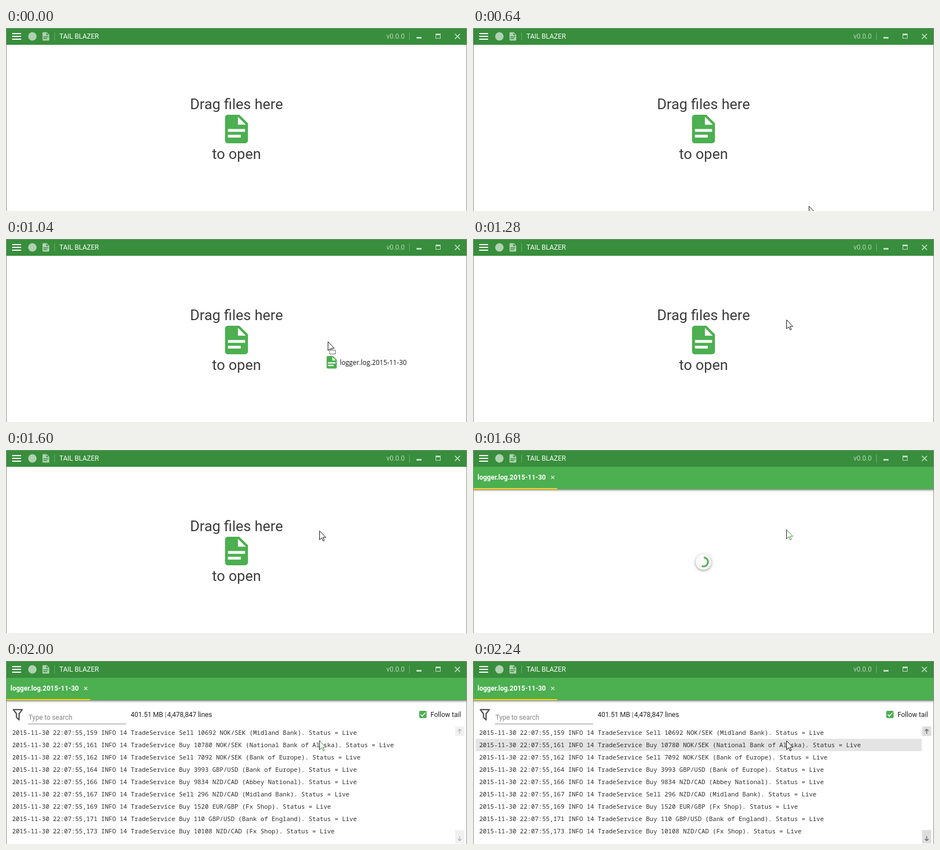
Recreate the animation shown at these times as an HTML page with a canvas. Size 821 by 327 pixels, loop 3.12 s.

```html
<!DOCTYPE html>
<html lang="en">
<head>
<meta charset="utf-8">
<title>Tail Blazer</title>
<style>
  html, body { margin: 0; width: 100%; height: 100%; overflow: hidden; background: #fff; }
  canvas { display: block; width: 821px; height: 327px; }
</style>
</head>
<body>
<canvas id="stage"></canvas>
<script>
const W = 821, H = 327, LOOP = 3120, STEP = 80;
const GREEN = '#4caf50', DARK = '#388e3c', FAINT = '#afd2b1';
const ROBOTO = 'Roboto, sans-serif';
const FILE = 'logger.log.2015-11-30';

// Moments of the story, in ms
const ENTER = 640, DROP = 1200, OPEN = 1680, LOADED = 1920, HOVER = 2080, SETTLED = 2240;

const canvas = document.getElementById('stage');
const dpr = window.devicePixelRatio || 1;
canvas.width = Math.round(W * dpr);
canvas.height = Math.round(H * dpr);
const c = canvas.getContext('2d');

const docIcon = new Path2D('M13,9H18.5L13,3.5V9M6,2H14L20,8V20A2,2 0 0,1 18,22H6C4.89,22 4,21.1 4,20V4C4,2.89 4.89,2 6,2M15,18V16H6V18H15M18,14V12H6V14H18Z');
const funnel = new Path2D('M15,19.9A1,1 0 0,1 13.3,20.7L9.3,16.7A1,1 0 0,1 9,15.9V10.75L4.2,4.6A1,1 0 0,1 5,3H19A1,1 0 0,1 19.8,4.6L15,10.75V19.9M7.04,5L11,10.06V15.58L13,17.58V10.05L16.96,5H7.04Z');
const arrow = new Path2D('M.5,.5V16.5L4.2,13L6.8,18.6L9,17.6L6.5,12.2H11.6Z');

const trades = [
  [159, 'Sell 10692 NOK/SEK (Midland Bank)'],
  [161, 'Buy 10780 NOK/SEK (National Bank of Alaska)'],
  [162, 'Sell 7092 NOK/SEK (Bank of Europe)'],
  [164, 'Buy 3993 GBP/USD (Bank of Europe)'],
  [166, 'Buy 9834 NZD/CAD (Abbey National)'],
  [167, 'Sell 296 NZD/CAD (Midland Bank)'],
  [169, 'Buy 1520 EUR/GBP (Fx Shop)'],
  [171, 'Buy 110 GBP/USD (Bank of England)'],
  [173, 'Buy 10108 NZD/CAD (Fx Shop)']
];

const clamp01 = v => Math.max(0, Math.min(1, v));

function rect(x, y, w, h, color) {
  c.fillStyle = color;
  c.fillRect(x, y, w, h);
}

function text(str, x, y, font, color, align = 'left') {
  c.font = font;
  c.fillStyle = color;
  c.textAlign = align;
  c.fillText(str, x, y);
}

function line(points, color, width) {
  c.beginPath();
  points.forEach(([x, y]) => c.lineTo(x, y));
  c.strokeStyle = color;
  c.lineWidth = width;
  c.stroke();
}

function cross(x, y, r, color, width) {
  line([[x - r, y - r], [x + r, y + r]], color, width);
  line([[x + r, y - r], [x - r, y + r]], color, width);
}

function disc(x, y, r, color) {
  c.beginPath();
  c.arc(x, y, r, 0, 7);
  c.fillStyle = color;
  c.fill();
}

function at(x, y, scale, draw) {
  c.save();
  c.translate(x, y);
  c.scale(scale, scale);
  draw();
  c.restore();
}

function icon(path, x, y, scale, color) {
  at(x, y, scale, () => {
    c.fillStyle = color;
    c.fill(path, 'evenodd');
  });
}

function titleBar() {
  rect(0, 0, W, 30, DARK);
  for (const y of [9, 14, 19]) rect(11, y, 16, 2, '#fff');
  disc(47, 15, 7.5, FAINT);
  icon(docIcon, 62, 6, 0.75, FAINT);
  rect(86, 8, 1, 14, '#6fae72');
  text('TAIL BLAZER', 95, 19, '12px ' + ROBOTO, '#fff');
  text('v0.0.0', 677.5, 19, '12px ' + ROBOTO, '#b7d6b9');
  rect(718, 8, 1, 14, '#6fae72');
  const tone = '#c6dfc7';
  rect(731, 16, 9, 3, tone);
  c.strokeStyle = tone;
  c.lineWidth = 1;
  c.strokeRect(765.5, 10.5, 8, 8);
  rect(765, 10, 9, 3, tone);
  cross(804, 15, 4.5, tone, 1.7);
}

function border() {
  rect(0, 0, W, 1, '#76917a');
  rect(0, 0, 1, H, '#8e8e8e');
  rect(W - 1, 0, 1, H, '#8e8e8e');
}

function dropHint() {
  const font = '26px ' + ROBOTO;
  text('Drag files here', 410.5, 145, font, '#3c3c3c', 'center');
  icon(docIcon, 379.9, 149.9, 2.55, GREEN);
  text('to open', 410.5, 234, font, '#3c3c3c', 'center');
}

function tabBar() {
  const shade = c.createLinearGradient(0, 70, 0, 75);
  shade.addColorStop(0, 'rgba(0,0,0,.5)');
  shade.addColorStop(0.4, 'rgba(0,0,0,.2)');
  shade.addColorStop(1, 'rgba(0,0,0,0)');
  rect(0, 70, W, 5, shade);
  rect(0, 30, W, 40, GREEN);
  text(FILE, 8, 53, 'bold 12px ' + ROBOTO, '#fff');
  cross(142, 49, 2.8, '#d3ebd4', 1.6);
  rect(1, 68, 149, 2, '#ffd600');
}

function spinner(t) {
  c.save();
  c.shadowColor = 'rgba(0,0,0,.4)';
  c.shadowBlur = 5 * dpr;
  c.shadowOffsetY = 1.5 * dpr;
  disc(410.5, 200, 14, '#fafafa');
  c.restore();
  const turn = (t - OPEN) / 1000 * Math.PI * 2;
  c.beginPath();
  c.arc(410.5, 200, 8, turn - 1.5, turn + 1.95);
  c.strokeStyle = GREEN;
  c.lineWidth = 3;
  c.stroke();
}

function searchRow() {
  icon(funnel, 7.2, 82.3, 1.15, '#555');
  const font = '12px ' + ROBOTO;
  text('Type to search', 40, 105, font, '#858585');
  rect(39, 112, 175, 1, '#8a8a8a');
  text('401.51 MB', 222, 100, font, '#202020');
  rect(284, 91, 1, 11, '#777');
  text('4,478,847 lines', 287, 100, font, '#202020');
  c.beginPath();
  c.roundRect(736, 89, 13, 13, 2);
  c.fillStyle = GREEN;
  c.fill();
  line([[738.5, 95.5], [741.3, 98.5], [746.7, 92.5]], '#fff', 1.6);
  text('Follow tail', 756, 100, font, '#202020');
}

function scrollButton(y, h, mid, dir, k) {
  const bg = 241 - 20 * k, fg = 178 - 82 * k;
  rect(800, y, 16, h, `rgb(${bg},${bg},${bg})`);
  const ink = `rgb(${fg},${fg},${fg})`;
  line([[808, mid - 4], [808, mid + 4]], ink, 1.3);
  line([[804.8, mid + dir], [808, mid + 4 * dir], [811.2, mid + dir]], ink, 1.3);
}

function log(t) {
  const k = clamp01((t - HOVER) / (SETTLED - HOVER));
  rect(5, 139, 794, 22, `rgba(0,0,0,${0.105 * k})`);
  trades.forEach(([ms, deal], i) => {
    text(`2015-11-30 22:07:55,${ms} INFO 14 TradeService ${deal}. Status = Live`,
      11, 132 + i * 22, '11px "Noto Sans Mono", monospace', '#2e2e2e');
  });
  scrollButton(117, 17, 126, -1, k);
  scrollButton(302, 24, 317, 1, k);
}

function pointerAt(t) {
  if (t >= OPEN) return [558, 142];
  const n = (t - ENTER) / STEP;
  if (n >= 8) return [558, 144];
  if (n >= 7) return [562, 151];
  const x = n < 1 ? 598 - 8 * n : Math.round(590 - 4.35 * (n - 1));
  return [x, Math.round(318 - 34.5 * n + 1.5 * n * n)];
}

function pointer(t) {
  const [x, y] = pointerAt(t);
  const tinted = t >= OPEN && t < SETTLED;
  at(x, y, 1, () => {
    c.lineJoin = 'miter';
    c.fillStyle = '#fff';
    c.fill(arrow);
    c.strokeStyle = tinted ? DARK : '#111';
    c.lineWidth = 1;
    c.stroke(arrow);
    if (tinted) rect(0, 0, 1, 17, '#222');
    if (t >= DROP) return;
    rect(3, 15, 11, 8, '#fff');
    c.setLineDash([2, 1]);
    c.strokeStyle = '#222';
    c.strokeRect(3.5, 15.5, 10, 7);
    c.setLineDash([]);
    icon(docIcon, -6.5, 23.75, 1.125, GREEN);
    text(FILE, 21.5, 42, '11.8px "Open Sans", sans-serif', '#151515');
  });
}

function draw(now) {
  const t = Math.floor(now % LOOP / STEP) * STEP;
  c.setTransform(dpr, 0, 0, dpr, 0, 0);
  rect(0, 0, W, H, '#fff');
  titleBar();
  if (t < OPEN) {
    dropHint();
  } else {
    tabBar();
    if (t < LOADED) {
      spinner(t);
    } else {
      searchRow();
      log(t);
    }
  }
  border();
  if (t >= ENTER) pointer(t);
}

const start = performance.now();
function tick() {
  draw(performance.now() - start);
  requestAnimationFrame(tick);
}
tick();
</script>
</body>
</html>
```
